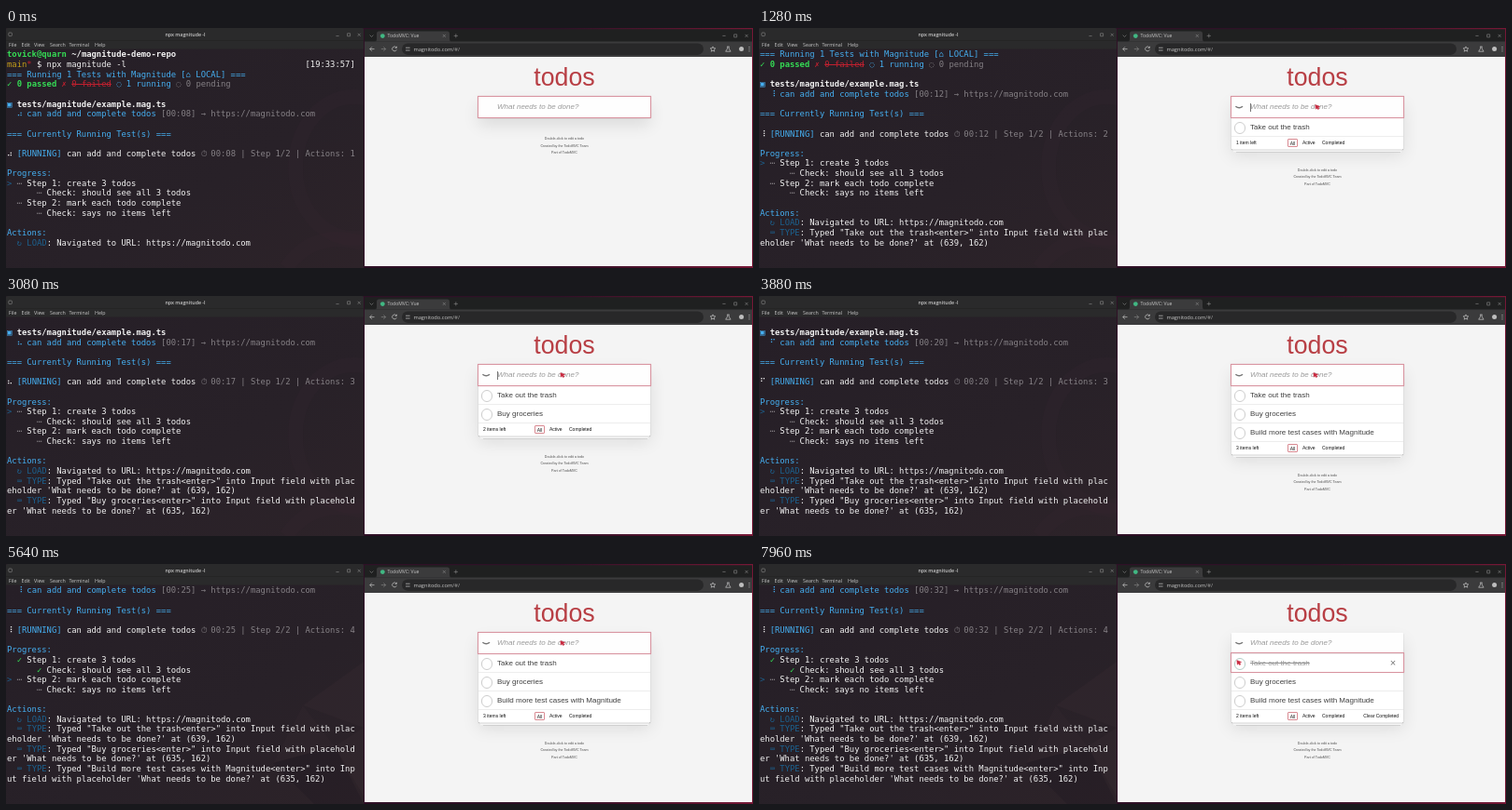
These frames come from a looping animation (800 by 258 pixels, 8000 ms). An HTML page:

```html
<!DOCTYPE html>
<html lang="en">
<head>
<meta charset="utf-8">
<title>Test run</title>
<style>
  html, body { margin: 0; width: 100%; height: 100%; overflow: hidden; background: #2b1023; }
  #stage { position: relative; width: 800px; height: 258px; overflow: hidden; }
  #stage > * { position: absolute; }
  svg { left: 0; top: 0; }
  svg text { font-family: "Open Sans", "Noto Sans", sans-serif; fill: #c8c8c8; }
  .line { fill: none; stroke: #c8c8c8; stroke-width: .7; }
  .dim { fill: none; stroke: #8c8c8c; stroke-width: .6; }

  #term { left: 0; top: 22.6px; width: 383px; height: 235.4px; overflow: hidden; }
  #log { position: absolute; left: 1px; bottom: 21.6px; color: #f2f2f2;
    font: 8.859px/10.667px "DejaVu Sans Mono", monospace; }
  #log div { height: 10.667px; white-space: pre; }
  #log i { display: inline-block; width: 5.333px; height: 10.667px; vertical-align: top;
    font-style: normal; font-family: "DejaVu Sans Mono", "DejaVu Sans", monospace; }
  .blue { color: #45aef0; }
  .deep { color: #1c618f; }
  .green { color: #35dc55; }
  .red { color: #c2202f; }
  .gray { color: #858085; }
  .gold { color: #c6a018; }

  #page { left: 384px; top: 31px; width: 415px; height: 225px; overflow: hidden; isolation: isolate; background: #f4f4f4;
    font-family: "Liberation Sans", Arial, sans-serif; color: #3e3e3e; }
  #page * { box-sizing: border-box; }
  #page div, #page span, #page svg { position: absolute; white-space: pre; }
  #title { left: 0; width: 428px; top: 6.6px; text-align: center; font-size: 26.76px; line-height: 30px; color: #b83f45; }
  #card { left: 122px; top: 43px; width: 184px; background: #fff;
    box-shadow: 0 .7px 1.3px rgba(0,0,0,.2), 0 8.4px 16.7px rgba(0,0,0,.1); }
  #entry { left: 0; top: 0; width: 184px; height: 22.2px; padding-left: 20px; background: #fefefe;
    font-size: 8.03px; line-height: 22.4px; }
  #entry.empty { font-style: italic; color: #999; }
  .ring { box-shadow: 0 0 .7px .6px #d894a0; z-index: 2; }
  #caret { left: 20px; top: 6.6px; width: .6px; height: 9.2px; background: #777; z-index: 3; }
  #arrow { left: 3px; top: 8px; z-index: 3; }
  .item { left: 0; width: 184px; height: 20px; padding-left: 20px; border-top: .5px solid #ededed;
    font-size: 8.03px; line-height: 19px; }
  .item::before { content: ""; position: absolute; left: 2.9px; top: 4px; width: 10.6px; height: 10.6px;
    border: .6px solid #cdcdcd; border-radius: 50%; }
  .item.done { color: #949494; text-decoration: line-through; }
  .item.done::before { border-color: #b5cdc8; }
  #cross { display: inline-block; left: 169.7px; top: -.5px; font-size: 11px; color: #777; }
  #bar { left: 0; width: 184px; height: 13.7px; border-top: .5px solid #ededed; font-size: 5.02px; line-height: 12.8px;
    color: #111; box-shadow: 0 .3px .3px rgba(0,0,0,.2), 0 2.7px 0 -1px #f6f6f6, 0 3px .4px -1px rgba(0,0,0,.2),
    0 5.4px 0 -2px #f6f6f6, 0 5.7px .7px -2px rgba(0,0,0,.2); }
  #bar span { top: 0; }
  #bar #all { left: 60px; top: 1.5px; width: 11.2px; height: 9.8px; line-height: 8.4px; text-align: center;
    border: .6px solid #d98a92; border-radius: 1px; }
  #info { left: 0; width: 428px; text-align: center; font-size: 3.68px; line-height: 7.4px; color: #4d4d4d; }
</style>
</head>
<body>
<div id="stage">
  <svg width="800" height="258" viewBox="0 0 800 258">
    <defs>
      <linearGradient id="night" x1="0" y1="0" x2="1" y2="1">
        <stop offset="0" stop-color="#261f27"/><stop offset=".6" stop-color="#282128"/><stop offset="1" stop-color="#2d2329"/>
      </linearGradient>
      <linearGradient id="edge">
        <stop offset=".5" stop-color="#2f1026"/><stop offset="1" stop-color="#761836"/>
      </linearGradient>
      <clipPath id="pane"><path d="M0 22H383V258H0z"/></clipPath>
    </defs>
    <path d="M383 0H800V258H383z" fill="url(#edge)"/>
    <path d="M0 22H383V258H0z" fill="url(#night)"/>
    <g clip-path="url(#pane)">
      <g id="rings" fill="none" stroke="#3a2a31" stroke-opacity=".16" stroke-width="16">
        <ellipse cx="372" cy="150" rx="62" ry="76"/><path d="M300 258Q330 215 383 232"/>
      </g>
      <g id="facets" fill="#46323a" fill-opacity=".18">
        <path d="M383 105L318 152L383 176z"/><path d="M318 152L286 214L352 196z" fill-opacity=".1"/>
        <path d="M352 196L383 176V250z"/><path d="M286 214L330 258H383L352 196z" fill="#15101a"/>
      </g>
    </g>
    <path d="M0 1Q0 0 2 0H381Q383 0 383 1V22.5H0z" fill="#2a2a2b"/>
    <path d="M0 13.5H383" stroke="#222" stroke-width=".6"/>
    <g class="dim">
      <rect x="2.8" y="5" width="3.6" height="3.6" rx=".8"/>
      <path d="M353.4 8.6h3.2M365.6 5.8h3v3h-3zM376.7 5.8l3 3m0-3l-3 3"/>
    </g>
    <text x="192" y="9" font-size="5.3" font-weight="600" text-anchor="middle">npx magnitude -l</text>
    <g font-size="5.3">
      <text x="3" y="20">File</text><text x="16.5" y="20">Edit</text><text x="30" y="20">View</text>
      <text x="47" y="20">Search</text><text x="67.5" y="20">Terminal</text><text x="95" y="20">Help</text>
    </g>

    <path d="M384 1.2H799V15H384z" fill="#1f2020"/>
    <path d="M384 14.5H799V31H384z" fill="#3b3b3c"/>
    <path d="M395 14.5Q397 14.5 397 12V6Q397 3.5 399.5 3.5H472.5Q475 3.5 475 6V12Q475 14.5 477 14.5z" fill="#3b3b3c"/>
    <rect x="424" y="16.5" width="323" height="12.4" rx="6.2" fill="#282829"/>
    <circle cx="403.3" cy="8.6" r="2.4" fill="#41b883"/>
    <text x="408.6" y="10.3" font-size="5.05">TodoMVC: Vue</text>
    <text x="436.4" y="24.6" font-size="5.7">magnitodo.com<tspan fill="#a5a5a5">/#/</tspan></text>
    <path class="dim" d="M389.6 7.6l1.9 1.9 1.9-1.9M467.8 6.9l3 3m0-3l-3 3M479.7 8.4h4.2m-2.1-2.1v4.2
      M767.4 8.4h3.2M779.7 6.9h3v3h-3zM791.6 6.9l3 3m0-3l-3 3"/>
    <g class="line">
      <path d="M394.5 22.6h-4.8m2.2-2.2l-2.2 2.2 2.2 2.2"/>
      <path d="M401.8 22.6h4.8m-2.2-2.2l2.2 2.2-2.2 2.2" stroke="#858585"/>
      <path d="M418 21a2.4 2.4 0 1 0 .3 2.3M418.4 19.7v1.7h-1.7"/>
      <path d="M428 21.2h4.6M428 24h4.6"/>
      <path d="M757 19.9l.8 1.8 2 .2-1.5 1.3.5 2-1.8-1-1.8 1 .5-2-1.5-1.3 2-.2z"/>
      <path d="M772.2 20h2.4M772.7 20v2l-2 3.2h5.4l-2-3.2v-2"/>
    </g>
    <circle cx="787.6" cy="22.6" r="2.5" fill="#bdbdbd"/>
    <path d="M796 20.4v.1M796 22.6v.1M796 24.8v.1" stroke="#c8c8c8" stroke-linecap="round"/>
  </svg>

  <div id="term"><div id="log"></div></div>

  <div id="page">
    <div id="title">todos</div>
    <div id="card">
      <div id="entry"></div>
      <div id="caret"></div>
      <svg id="arrow" width="11" height="7"><path d="M1.4 2.2Q5.2 5.4 9 2.2" fill="none" stroke="#777" stroke-width="1.5"/></svg>
      <div class="item">Take out the trash<span id="cross">×</span></div>
      <div class="item">Buy groceries</div>
      <div class="item">Build more test cases with Magnitude</div>
      <div id="bar">
        <span id="count" style="left:5px"></span>
        <span id="all">All</span>
        <span style="left:76px">Active</span>
        <span style="left:97px">Completed</span>
        <span id="clear" style="right:5px">Clear Completed</span>
      </div>
    </div>
    <div id="info">Double-click to edit a todo
Created by the TodoMVC Team
Part of TodoMVC</div>
  </div>

  <svg id="pointer" width="800" height="258"><path d="M-2.2 -2.4L2.6 -.6 .8 .3 1.8 2 .5 2.6 -.4 1 -1.7 2.2z" fill="#c92a40" stroke="#c92a40" stroke-width=".5" stroke-linejoin="round"/></svg>
</div>

<script>
const LOOP = 8000, COLS = 60, TYPING = 240;
const ADDED = [580, 2360, 3680];
const LOGGED = [1080, 2880, 4700];
const CHECKED = 7700;
const SPINNER = '⠋⠙⠹⠸⠼⠴⠦⠧⠇⠏';
const TODOS = ['Take out the trash', 'Buy groceries', 'Build more test cases with Magnitude'];
const SPOTS = [639, 635, 635];

const $ = id => document.getElementById(id);
const items = [...document.querySelectorAll('.item')];
const escape = s => s.replace(/</g, '&lt;').replace(/>/g, '&gt;');
const ink = (color, s) => `<span class="${color}">${escape(s)}</span>`;
const bold = s => `<b>${s}</b>`;
const cell = (s, color = '') => `<i class="${color}">${s}</i>`;
const passed = (times, t) => times.filter(at => t >= at).length;
const show = (el, on) => { el.style.display = on ? '' : 'none'; };

function typedLines(todo, i) {
  const text = `Typed "${todo}<enter>" into Input field with placeholder 'What needs to be done?' at (${SPOTS[i]}, 162)`;
  return [`  ${cell('⌨', 'deep')} ${ink('deep', 'TYPE')}: ${escape(text.slice(0, COLS))}`, escape(text.slice(COLS))];
}

function terminalLines(t) {
  const logged = passed(LOGGED, t);
  const second = logged === 3;
  const step = Math.floor(5.4 + .0297 * t + .0004 * Math.max(0, t - 3880));
  const spin = SPINNER[step % SPINNER.length];
  const clock = '00:' + String(Math.floor(8.6 + t * .003)).padStart(2, '0');
  const mark = done => done ? cell('✓', 'green') : cell('⋯', 'gray');
  const cursor = on => on ? ink('deep', '>') : ' ';
  return [
    bold(ink('green', 'tovick@quarn')) + bold(' ~/magnitude-demo-repo'),
    ink('gold', 'main') + ink('red', '*') + ' $ npx magnitude -l' + ' '.repeat(36) + '[19:33:57]',
    ink('blue', '=== Running 1 Tests with Magnitude [') + cell('⌂', 'blue') + ink('blue', ' LOCAL] ==='),
    bold(cell('✓', 'green') + ink('green', ' 0 passed')) + ` ${cell('✗', 'red')} <s class="red">0 failed</s> ` +
      `${cell('◌', 'blue')}${ink('blue', ' 1 running')} ${cell('◌', 'gray')}${ink('gray', ' 0 pending')}`,
    '',
    cell('▣', 'blue') + bold(' tests/magnitude/example.mag.ts'),
    `  ${cell(spin, 'blue')} ${ink('blue', 'can add and complete todos')} ${ink('gray', `[${clock}] `)}` +
      cell('→', 'gray') + ink('gray', ' https://magnitodo.com'),
    '',
    ink('blue', '=== Currently Running Test(s) ==='),
    '',
    `${cell(spin)} ${ink('blue', '[RUNNING]')} can add and complete todos ${cell('⏱', 'gray')} ` +
      ink('gray', `${clock} | Step ${second ? 2 : 1}/2 | Actions: ${logged + 1}`),
    '',
    ink('blue', 'Progress:'),
    `${cursor(!second)} ${mark(second)} Step 1: create 3 todos`,
    `      ${mark(second)} Check: should see all 3 todos`,
    `${cursor(second)} ${mark(false)} Step 2: mark each todo complete`,
    `      ${mark(false)} Check: says no items left`,
    '',
    ink('blue', 'Actions:'),
    `  ${cell('↻', 'deep')} ${ink('deep', 'LOAD')}: Navigated to URL: https://magnitodo.com`,
    ...TODOS.slice(0, logged).flatMap(typedLines)
  ];
}

function drawPage(t) {
  const count = passed(ADDED, t);
  const done = t >= CHECKED;
  const progress = count < 3 ? (t - ADDED[count] + TYPING) / TYPING : 0;
  const typed = progress > 0 ? TODOS[count].slice(0, Math.ceil(progress * TODOS[count].length)) : '';
  const entry = $('entry');
  entry.textContent = typed || 'What needs to be done?';
  entry.className = (typed ? '' : 'empty ') + (done ? '' : 'ring');

  // The caret restarts its blink each time a todo is entered.
  const since = t - (count ? ADDED[count - 1] : -200);
  show($('caret'), !done && !typed && (since * .003) % 1 < .5);
  show($('arrow'), count);

  items.forEach((item, i) => {
    item.style.top = 22.2 + i * 20 + 'px';
    show(item, i < count);
  });
  items[0].className = done ? 'item done ring' : 'item';
  show($('cross'), done);

  const left = count - done;
  const end = 22.2 + count * 20;
  $('bar').style.top = end + 'px';
  show($('bar'), count);
  $('count').textContent = `${left} item${left === 1 ? '' : 's'} left`;
  show($('clear'), done);
  const height = end + (count ? 13.7 : 0);
  $('card').style.height = height + 'px';
  $('info').style.top = 43 + height + 20 + 'px';
}

function drawPointer(t) {
  const ease = (from, to) => {
    const p = Math.min(1, Math.max(0, (t - from) / (to - from)));
    return p * p * (3 - 2 * p);
  };
  const go = ease(7560, 7680);
  const x = 598 - 2 * ease(1960, 2040) - 82 * go;
  $('pointer').firstChild.setAttribute('transform', `translate(${x} ${85 + 21 * go})`);
  show($('pointer'), t >= 260);
}

function frame() {
  const t = performance.now() % LOOP;
  $('log').innerHTML = terminalLines(t).map(line => `<div>${line}</div>`).join('');
  show($('rings'), t < 4000);
  show($('facets'), t >= 4000);
  drawPage(t);
  drawPointer(t);
  requestAnimationFrame(frame);
}
frame();
</script>
</body>
</html>
```
